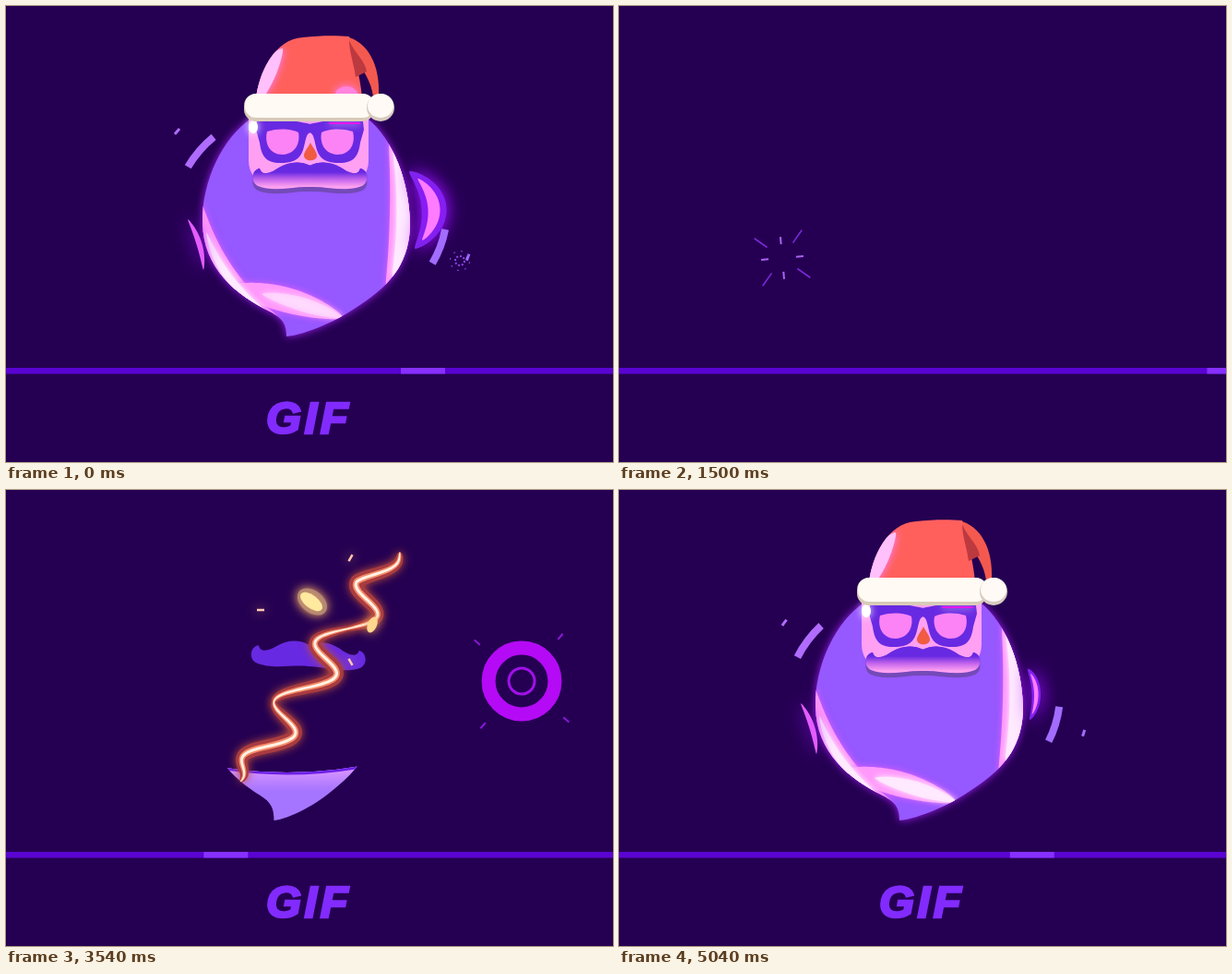
Animation of 658x494 px, one loop 5.07 s. Source, as an HTML page with a canvas:

```html
<!DOCTYPE html>
<html lang="en">
<head>
<meta charset="utf-8">
<title>Festive loop</title>
<style>
html, body { margin: 0; width: 100%; height: 100%; overflow: hidden; background: #250052; }
canvas { display: block; width: 658px; height: 494px; }
</style>
</head>
<body>
<canvas id="stage" width="658" height="494"></canvas>
<script>
const c = document.getElementById('stage').getContext('2d');
const LOOP = 5070, STEP = 30;
const BG = '#250052', VIOLET = '#6829e2', PINK = '#ff98fb', PALE = '#ffeaff';
const TAU = Math.PI * 2, DEG = Math.PI / 180;
const { sin, cos, min, max } = Math;

const ramp = (t, a, b) => min(1, max(0, (t - a) / (b - a)));
const mix = (a, b, k) => a + (b - a) * k;
const smooth = k => k * k * (3 - 2 * k);
const outCubic = k => 1 - (1 - k) ** 3;
const pulse = (t, a, b, d, e) => min(ramp(t, a, b), 1 - ramp(t, d, e));
const pop = (t, start, len, over) => {
  const p = ramp(t, start, start + len) - 1;
  return max(0, 1 + (over + 1) * p ** 3 + over * p * p);
};
const rand = n => { const v = sin(n * 127.1) * 43758.5; return v - Math.floor(v); };

function group(draw) { c.save(); draw(); c.restore(); }
function glow(color, blur) { c.shadowColor = color; c.shadowBlur = blur; }
function fill(path, color) { c.fillStyle = color; c.fill(path); }
function about(x, y, sx, sy = sx, rot = 0) {
  c.translate(x, y); c.rotate(rot); c.scale(sx, sy); c.translate(-x, -y);
}
function mirrored(draw) {
  draw();
  group(() => { about(329.5, 0, -1, 1); draw(); });
}
function line(x1, y1, x2, y2, color, w) {
  c.strokeStyle = color; c.lineWidth = w;
  c.beginPath(); c.moveTo(x1, y1); c.lineTo(x2, y2); c.stroke();
}
function arc(x, y, r, color, w, a = 0, b = TAU) {
  c.strokeStyle = color; c.lineWidth = w;
  c.beginPath(); c.arc(x, y, r, a, b); c.stroke();
}
function oval(x, y, rx, ry, color, rot = 0) {
  c.fillStyle = color;
  c.beginPath(); c.ellipse(x, y, rx, ry, rot, 0, TAU); c.fill();
}
function box(x, y, w, h, r, color) {
  c.fillStyle = color;
  c.beginPath(); c.roundRect(x, y, w, h, r); c.fill();
}
function rays(x, y, n, r1, r2, color, w, turn = 0) {
  for (let i = 0; i < n; i++) {
    const a = turn + i * TAU / n, u = cos(a), v = sin(a);
    line(x + u * r1, y + v * r1, x + u * r2, y + v * r2, color, w);
  }
}

// A curve is a function of u; bow bends a segment sideways by h
const bow = (x1, y1, x2, y2, h = 0) => u => {
  const l = Math.hypot(x2 - x1, y2 - y1), k = 4 * h * u * (1 - u) / l;
  return [mix(x1, x2, u) - (y2 - y1) * k, mix(y1, y2, u) + (x2 - x1) * k];
};
// Stroke along a curve that tapers at both ends
function trail(curve, w, color, a = 0, b = 1, power = 0.7) {
  if (b - a < 0.01) return;
  const n = 60, up = [], down = [], e = (b - a) / 200;
  for (let i = 0; i <= n; i++) {
    const u = mix(a, b, i / n), [x, y] = curve(u);
    const [x1, y1] = curve(u - e), [x2, y2] = curve(u + e);
    const h = w / 2 * Math.abs(sin(Math.PI * i / n)) ** power / (Math.hypot(x2 - x1, y2 - y1) || 1);
    up.push([x - (y2 - y1) * h, y + (x2 - x1) * h]);
    down.unshift([x + (y2 - y1) * h, y - (x2 - x1) * h]);
  }
  c.fillStyle = color;
  c.beginPath();
  up.concat(down).forEach(p => c.lineTo(...p));
  c.fill();
}

const beardShape = new Path2D('M266 122C235 142 212 190 213 235C214 285 250 313 286 331C300 338 304 345 304 358C325 356 360 341 385 323C420 300 438 275 438 235C437 190 420 145 392 122Z');
const stache = new Path2D('M330 173C318 167 306 169 296 175C286 182 277 184 275 176C267 177 264 190 273 195C290 202 312 195 330 196Z');
const frame = new Path2D('M272 125C290 122 314 124 330 128V137C325 138 325 146 322 156C318 168 309 170 297 170C283 170 277 164 275 148L271 134Z');
const lens = new Path2D('M283 136C295 132 310 133 317 137C319 147 315 160 300 161C285 161 280 148 283 136Z');
const nose = new Path2D('M330 148C333 154 337 158 337 162C337 169 323 169 323 162C323 158 327 154 330 148Z');
const cap = new Path2D('M271 100C274 74 290 36 322 34C340 32 358 32 372 33C376 50 384 74 386 100Z');
const tail = new Path2D('M368 33C392 38 406 64 404 98H398C396 82 388 70 375 52Z');
const fold = new Path2D('M372 37C377 50 390 60 391 71L379 77C377 62 372 50 372 37Z');

function beard(s, shine) {
  const grow = smooth(ramp(s, 3540, 3960));
  const level = mix(mix(370, 294, ramp(s, 3330, 3540)), 100, grow);
  const surface = () => {
    c.beginPath();
    c.moveTo(195, level);
    c.quadraticCurveTo(320, level + 24 * (1 - grow), 450, level);
  };
  group(() => {
    c.translate(-6 * (1 - smooth(ramp(s, 4500, 4980))) * grow, 0);
    about(229, 0, mix(0.82, 1, grow), 1);
    surface();
    c.lineTo(450, 380); c.lineTo(195, 380); c.clip();
    group(() => {
      glow('#a020f0', 9 * shine);
      fill(beardShape, grow < 0.5 ? '#a675ff' : '#9658ff');
    });
    c.clip(beardShape);
    if (grow < 1) {
      const g = c.createLinearGradient(0, level, 0, level + 32);
      g.addColorStop(0, '#f0a4ff'); g.addColorStop(1, '#e39aff00');
      c.fillStyle = g; c.fillRect(190, level, 260, 40);
      surface();
      c.strokeStyle = '#6d20e8'; c.lineWidth = 5; c.stroke();
    }
    if (!shine) return;
    c.globalAlpha = shine;
    const edge = bow(416, 140, 412, 312, -18), side = bow(211, 212, 298, 340, 21), foot = bow(238, 304, 366, 338, -3);
    glow('#e060ff', 7);
    trail(edge, 32, PINK);
    trail(side, 20, PINK);
    trail(foot, 27, PINK);
    glow('#fff', 6);
    trail(edge, 17, PALE, 0.05, 0.9);
    trail(side, 8, PALE, 0.2, 0.9);
    c.globalAlpha = shine * (1 - 0.7 * ramp(s, 5035, 5085));
    trail(foot, 15, PALE, 0.3, 1);
  });
}

function face(s, shine) {
  const k = pop(s, 3980, 230, 1.6), early = 1 - ramp(s, 3600, 3950);
  if (k > 0) group(() => {
    about(329, 148, k);
    box(263, 122, 130, 74, [0, 0, 28, 28], '#ffa0f3');
    const n = pop(s, 4560, 180, 2);
    if (n > 0) group(() => { about(330, 160, n); fill(nose, '#f05b42'); });
    mirrored(() => {
      fill(frame, VIOLET);
      fill(lens, '#fb83f5');
    });
    c.globalAlpha = shine;
    glow('#fff', 8);
    oval(268, 131, 5, 7, '#fff');
    line(350, 127, 384, 127, '#e319ea', 2);
  });
  const m = pop(s, 3330, 180, 1.8);
  if (m > 0) group(() => {
    c.translate(-1.5 * early, -5 * early);
    about(329, 182, m, m, 3 * DEG * early);
    if (k > 0) group(() => {
      c.translate(0, 5);
      mirrored(() => fill(stache, '#744ab8'));
    });
    mirrored(() => fill(stache, VIOLET));
    if (!shine) return;
    c.globalAlpha = shine;
    const g = c.createLinearGradient(0, 180, 0, 196);
    g.addColorStop(0, VIOLET); g.addColorStop(0.5, '#c566ec'); g.addColorStop(1, '#ffa2f0');
    mirrored(() => fill(stache, g));
  });
}

function hat(s, shine) {
  const rise = pop(s, 4560, 250, 1.4);
  if (rise > 0) group(() => {
    about(330, 100, mix(0.8, 1, min(1, rise)), rise);
    fill(tail, '#f4594f');
    fill(cap, '#ff605c');
    fill(fold, '#bd3940');
    c.clip(cap);
    c.globalAlpha = shine;
    glow('#ff80ff', 10);
    trail(bow(268, 112, 300, 46, -4), 20, '#ffc0fb');
    c.globalAlpha = shine * ramp(s, 5040, 5070);
    oval(369, 96, 12, 9, '#ff83df');
  });
  const w = smooth(ramp(s, 4260, 4440));
  if (!w) return;
  const m = 1 - smooth(ramp(s, 4490, 4620));
  const x = 258 - 7 * m, full = (141 + 18 * m) * w, top = 95 + 3 * m, h = 30 - 4 * m;
  group(() => {
    box(x, top, full, h, 13, '#d8cbb8');
    box(x + 1, top, full - 1, h - 4, 12, '#fffaf4');
    c.globalAlpha = m;
    glow('#ff00ee', 12);
    trail(bow(x + full - 55, top, x + full - 25, top + 36, -24), 7, '#ff74f2');
  });
  const p = pop(s, 4500, 180, 2);
  oval(406, 110, 15 * p, 15 * p, '#d8cbc0');
  oval(406, 108, 14 * p, 13 * p, '#fffaf5');
}

// Two dashes turning about centres beside the head
function orbit(s) {
  const k = pulse(s, 4300, 4440, 5070, 5220);
  if (!k) return;
  const turn = (17 + (s - 5040) * 0.123) * DEG;
  const half = mix(4.5, 10, ramp(s, 4470, 5040)) * DEG * k;
  const dash = (x, y, r, a, color) => {
    arc(x, y, r, color, 8, a - half, a + half);
    if (s > 4800) arc(x, y, r + 32, color, 3, a - half / 7, a + half / 7);
  };
  dash(365, 221, 113, turn, '#a26cff');
  dash(303, 237, 123, turn + 200 * DEG, s < 4700 ? '#cf77ff' : '#b06cff');
  if (s > 5040) group(() => {
    c.setLineDash([2, 4]);
    rays(492, 276, 8, 4, 11 + (s - LOOP) / 25, '#8b48e8', 2, 0.2);
  });
}

function flares(s) {
  const k = pulse(s, 5000, 5070, 5140, 5330), left = pulse(s, 4930, 5010, 5140, 5330);
  const right = bow(437, 179, 443, 263, -24);
  group(() => {
    glow('#9a10ff', 20);
    c.globalAlpha = left;
    trail(bow(197, 231, 214, 286, -4), 6, '#e55cff');
    group(() => {
      about(446, 222, mix(0.2, 1, k ** 3), mix(0.2, 1, k));
      trail(right, 27, '#7f24ee');
      trail(right, 13, '#ff7bff', 0.1, 0.9);
    });
  });
}

function santa(s) {
  if (s < 3300 || s >= 5830) return;
  const q = ramp(s, 5340, 5830), shine = ramp(s, 4680, 5010), k = 1 - 0.9 * q * q;
  group(() => {
    about(325, 185, k * (1 + 0.1 * sin(q * 9) * q), k, -0.5 * q * q);
    beard(s, shine); face(s, shine); hat(s, shine); flares(s);
  });
  orbit(s);
}

function collapse(t) {
  const k = pulse(t, 600, 740, 820, 1050);
  if (k > 0) group(() => {
    about(325, 185, 0.7 + 0.3 * outCubic(ramp(t, 600, 780)) + 0.25 * ramp(t, 780, 1050), undefined, (t - 780) * 0.0012);
    c.globalAlpha = min(1, k * 1.5);
    glow('#5a20ff', 18);
    for (let i = 0; i < 9; i++) {
      const long = i % 3 === 0, mid = (i * 40 - 135) * DEG, r = 80 + 4 * sin(i * 2);
      const half = (long ? 22 : 7) * DEG;
      const curve = u => {
        const a = mid + mix(-half, half, u);
        return [325 + r * cos(a), 185 + r * sin(a)];
      };
      trail(curve, 11 * k, '#4a12b8');
      trail(curve, 3.5 * k, '#74efff');
      const [x, y] = curve(0.5), size = (long ? 18 : 6) * k;
      group(() => {
        about(x, y, size, size, i * 1.7);
        trail(bow(x - 1, y, x + 1, y), 3 / size, '#70eaff');
        trail(bow(x, y - 0.6, x, y + 0.6), 3 / size, '#70eaff');
      });
    }
  });
  const b = 1 - ramp(t, 800, 930);
  if (t < 760 || !b) return;
  group(() => {
    about(329, 182, b);
    glow('#a000ff', 14);
    arc(342, 181, 8, '#f08cff', 9);
    oval(325, 182, 13, 12, '#d89cff');
    oval(329, 181, 7, 8, '#fff');
    oval(320, 163, 10, 6, '#ee5a40', -0.1);
    oval(316, 168, 7, 3, '#fff');
    trail(bow(309, 230, 330, 207, -1), 9, '#ff85ee');
  });
}

function burst(t, x, y, start, bend) {
  if (t < 900 || t > start + 360) return;
  group(() => {
    glow('#c020ff', 12);
    trail(bow(325, 185, x, y, bend), 6, '#e987ff', smooth(ramp(t, 990, start + 60)), smooth(ramp(t, 900, start)));
  });
  if (t < start) return;
  const k = outCubic(ramp(t, start, start + 210)), out = ramp(t, start + 210, start + 330);
  group(() => {
    c.globalAlpha = 1 - 0.8 * out;
    rays(x, y, 4, 20 * k + 17 * out, 37 * k, '#7929d8', 1.6, 35 * DEG);
    rays(x, y, 4, 15 * k + 8 * out, 23 * k, '#ab62f4', 2, -5 * DEG);
  });
}

function comets(t) {
  if (t < 1650 || t > 3360) return;
  const d = t - 2370, fade = 1 - ramp(t, 2490, 2730);

  group(() => {
    c.globalAlpha = fade;
    c.translate(-0.85 * d, 0);
    glow('#6a18ff', 7);
    trail(bow(80, 234, 385, 234), 11, '#7540f5', 0, 1, 0.4);
    glow('#b000ff', 15);
    trail(bow(52, 238, 112, 208, -6), 24, '#ffbaff');
    trail(bow(92, 212, 145, 236, 4), 14, '#ffa0ff');
    trail(bow(57, 233, 106, 211, -5), 13, '#fff');
  });

  const home = smooth(ramp(t, 2600, 3300)), size = pulse(t, 1800, 2000, 3000, 3330);
  const loop = u => {
    const a = u - d * 0.006;
    const x = mix(140, 30, home) * cos(a), y = -mix(17, 25, home) * sin(a);
    return [mix(400, 329, home) + x - y * 0.06, mix(139, 182, home) + y + x * 0.01];
  };
  group(() => {
    glow('#6a18ff', 7);
    trail(loop, 17 * size, '#6b39f2', -1.85, 1.35, 0.9);
    glow('#e000ff', 12);
    trail(loop, 17 * size, '#ff67ea', -0.7, 0.9);
    trail(loop, 8 * size, '#ffe2ff', -0.55, 0.6);
  });

  const flash = pulse(t, 2220, 2340, 2390, 2520);
  group(() => {
    c.globalAlpha = flash;
    glow('#8c00ff', 18);
    for (let i = 0; i < 4; i++) {
      const y = 240 + i * 7, x = 328 + 12 * rand(i);
      trail(bow(x, y, x + 95, y + 8 * rand(i + 5) - 4), 26 - 4 * i, ['#ae20e8', '#c32ce8', '#ed39e9', '#ff9df8'][i]);
    }
  });

  const sweep = k => [160 + 351 * k, 256 + 6 * sin(Math.PI * k) - 42 * max(0, k) ** 4];
  group(() => {
    c.globalAlpha = fade;
    glow('#c000d8', 4);
    trail(sweep, 6, '#ff79d4', d / 350, 1 + d / 350, 0.6);
    if (t < 2190) return;
    for (let i = 0; i < 4; i++) {
      const x = 22 + 88 * i - 0.2 * d, y = 231 + 30 * rand(i);
      trail(bow(x - 8, y, x + 8, y - 2, -2), 5, '#c272ff');
      oval(380 + 28 * i - 0.03 * d, 163 + 9 * rand(i + 9), 2.5, 1.5, '#b238e8');
    }
  });
}

// Skewed wave along a slanted axis
function ribbon(u) {
  const ease = min(1, 7 * u, 7 * (1 - u)), a = TAU * (304 * u + 15) / 78;
  const along = 304 * u - 9.5 * sin(a) * ease, off = 20 * sin(a) * ease;
  return [427 - 0.57 * along + 0.82 * off, 67 + 0.82 * along + 0.57 * off];
}
function pour(t) {
  if (t < 3270 || t > 3810) return;
  const a = smooth(ramp(t, 3550, 3810)), b = outCubic(ramp(t, 3270, 3520));
  const layer = (w, color) => {
    for (let i = 0; i < 3; i++) trail(ribbon, w, color, max(a, i / 3 - 0.01), min(b, (i + 1) / 3 + 0.01), 0.4);
  };
  group(() => {
    glow('#c05038', 10);
    layer(15, '#a83c40');
    c.shadowBlur = 0;
    layer(7, '#f58a68');
    layer(3.2, '#fff2e4');
    const k = pulse(t, 3420, 3500, 3570, 3720);
    glow('#e8a060', 12);
    oval(397, 146, 5 * k, 9 * k, '#ffd78e', 0.4);
    oval(332, 121, 18 * k, 12 * k, '#a88378', 0.65);
    oval(331, 121, 14 * k, 7 * k, '#ffeaa0', 0.65);
    c.globalAlpha = k;
    const m = 65 + (t - 3540) * 0.08;
    rays(341, 130, 3, m - 4, m + 4, '#ffc6b2', 2.5, 60 * DEG);
  });
}

function shock(t) {
  const fade = ramp(t, 3540, 3780);
  if (t < 3330 || fade === 1) return;
  const k = outCubic(ramp(t, 3330, 3570)), r = 60 * k + 30 * fade;
  arc(559, 207, 36 * k + 12 * fade, '#b50af5', 15 * (1 - fade));
  arc(559, 207, 14 * ramp(t, 3420, 3540) + 22 * fade, '#a010e8', 3 * (1 - fade));
  rays(559, 207, 4, r, r + 8 * (1 - fade), '#8a18d8', 2, 41 * DEG);
}

function label(t) {
  c.font = 'italic bold 49px "Liberation Sans", Arial, sans-serif';
  c.fillStyle = c.strokeStyle = '#822bff';
  c.lineWidth = 2.6;
  let x = 282;
  [...'GIF'].forEach((ch, i) => {
    const w = c.measureText(ch).width;
    group(() => {
      about(x + w / 2 + 2, 446, t < 1200 ? 1 : pop(t, 2040 + i * 90, 270, 3));
      c.fillText(ch, x, 463);
      c.strokeText(ch, x, 463);
    });
    x += w + 3.5;
  });
  // Diagonal cuts widen until the word is gone
  if (t >= 600 && t < 1200) group(() => {
    c.beginPath(); c.rect(270, 415, 120, 60); c.clip();
    for (let px = 232; px < 450; px += 14) line(px, 482, px + 57, 410, BG, 13 * ramp(t, 600, 960));
  });
  const k = ramp(t, 2280, 2370), f = ramp(t, 2390, 2550);
  if (k > 0 && f < 1) group(() => {
    c.globalAlpha = 1 - f;
    const r = 9.5 * k + 8 * f;
    arc(372, 464, r, '#d3a4ff', 2);
    rays(372, 464, 4, 0, r * (1 - f), '#b56cff', 1.5);
    rays(372, 464, 8, r + 4, r + 12 * k, '#7d2cdf', 1.3, 25 * DEG);
  });
}

function bar(t) {
  c.fillStyle = '#5a04d2';
  c.fillRect(0, 392, 658, 6.5);
  c.fillStyle = '#8730ff';
  c.fillRect((478 + 708 * t / LOOP) % 708 - 50, 392, 48, 6.5);
}

function draw(t) {
  c.fillStyle = BG;
  c.fillRect(0, 0, 658, 494);
  bar(t);
  comets(t);
  shock(t);
  santa(t < 1200 ? t + LOOP : t);
  pour(t);
  collapse(t);
  burst(t, 498, 98, 1170, 20);
  burst(t, 177, 273, 1290, -15);
  label(t);
}

const start = performance.now();
function tick() {
  const t = (performance.now() - start) % LOOP;
  draw(Math.floor(t / STEP) * STEP);
  requestAnimationFrame(tick);
}
tick();
</script>
</body>
</html>
```
